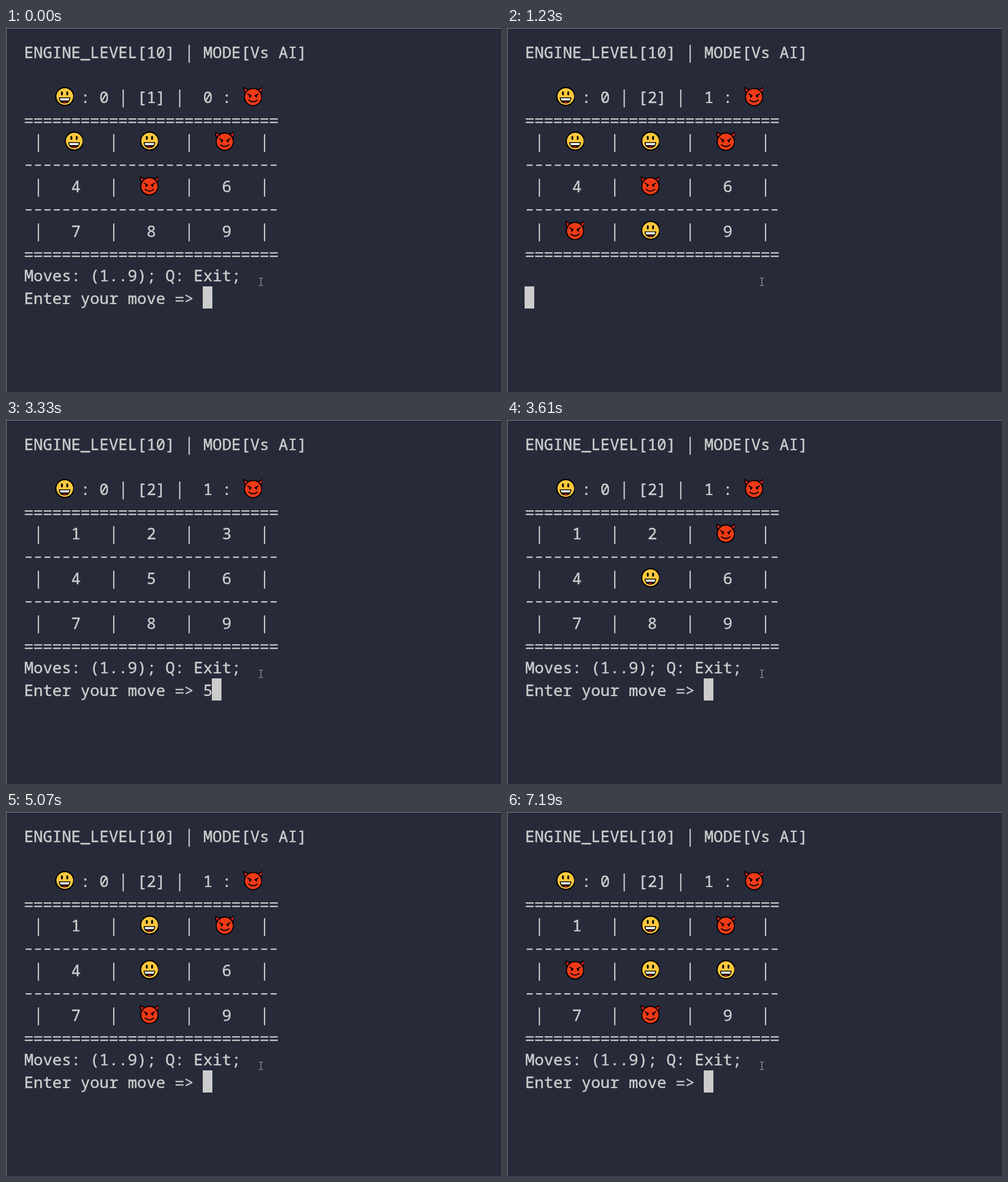
These frames come from a looping animation (873 by 641 pixels, 8000 ms). An HTML page with a canvas:

```html
<!DOCTYPE html>
<html lang="en">
<head>
<meta charset="utf-8">
<title>Terminal tic-tac-toe</title>
<style>
html, body { margin: 0; width: 100%; height: 100%; overflow: hidden; background: #272a39; }
canvas { display: block; }
</style>
</head>
<body>
<canvas id="stage" width="873" height="641"></canvas>
<script>
const ctx = document.getElementById('stage').getContext('2d');
const BG = '#272a39', FG = '#cccccc';
const LEFT = 31.5, TOP = 23, CELL = 16.62, LINE = 39.3;
const DURATION = 8000;

// Each state: start time, board (o = player, x = engine), typed text, phase
const states = [
  [0, 'oox.x....', '', 'prompt'],
  [930, 'oox.x....', '8', 'prompt'],
  [1080, '', '', 'clear'],
  [1230, 'oox.x.xo.', '', 'wait'],
  [1940, '.........', '', 'prompt'],
  [3330, '.........', '5', 'prompt'],
  [3480, '....o....', '', 'wait'],
  [3610, '..x.o....', '', 'prompt'],
  [4830, '..x.o....', '2', 'prompt'],
  [4970, '.ox.o....', '', 'wait'],
  [5070, '.ox.o..x.', '', 'prompt'],
  [6920, '.ox.o..x.', '6', 'prompt'],
  [7070, '.ox.oo.x.', '', 'home'],
  [7190, '.oxxoo.x.', '', 'prompt']
];

const colX = col => LEFT + col * CELL;
const rowY = row => TOP + row * LINE;

// Line-like characters as boxes: x, y from the baseline, width, height
const bars = {
  '|': [[7.9, -23.5, 2.2, 31.5]],
  '-': [[3.2, -9.2, 10.4, 2.3]],
  '=': [[1.6, -12, 14, 2.3], [1.6, -6, 14, 2.3]]
};

function text(str, row, col = 0, color = FG) {
  ctx.fillStyle = ctx.strokeStyle = color;
  ctx.lineWidth = 0.45;
  [...str].forEach((ch, i) => {
    const x = colX(col + i), base = rowY(row) + 30.2;
    if (bars[ch]) {
      for (const [dx, dy, w, h] of bars[ch]) ctx.fillRect(x + dx, base + dy, w, h);
    } else {
      ctx.fillText(ch, x + 0.4, base);
      ctx.strokeText(ch, x + 0.4, base);
    }
  });
}

function cursor(row, col) {
  ctx.fillStyle = FG;
  ctx.fillRect(Math.round(colX(col) - 0.5), Math.round(rowY(row)), 17, 39);
}

function shape(path, fill, width) {
  const p = new Path2D(path);
  if (fill) { ctx.fillStyle = fill; ctx.fill(p); }
  if (width) { ctx.lineWidth = width; ctx.stroke(p); }
}

function disc(x, y, rx, ry, fill, width) {
  ctx.beginPath();
  ctx.ellipse(x, y, rx, ry, 0, 0, 7);
  ctx.fillStyle = fill;
  ctx.fill();
  if (width) { ctx.lineWidth = width; ctx.stroke(); }
}

function smiley() {
  disc(0.8, 0, 15.8, 15.8, '#ffc83d', 2.2);
  disc(-4.2, -5.5, 1.7, 3.6, '#000');
  disc(5.2, -5.5, 1.7, 3.6, '#000');
  shape('M-9 2.5H10C9.5 8.5 6 11.5 .5 11.5S-8.5 8.5-9 2.5Z', '#000', 1.5);
  shape('M-8 3.2H9L8 7H-7Z', '#fff');
  shape('M-3 10.5Q.5 7.5 4 10.5Q.5 12-3 10.5Z', '#e81224');
}

function devil() {
  shape('M-13-5Q-17-11-15.3-16.2Q-12-12.5-6-12.5Z', '#d01c1c', 1.8);
  shape('M14-5Q18-11 16.3-16.2Q13-12.5 7-12.5Z', '#d01c1c', 1.8);
  disc(0.5, 1, 15.2, 15.2, '#f03a17', 2);
  shape('M-9-4.5L-3-1.5M10-4.5L4-1.5', null, 1.8);
  disc(-5, 0, 1.7, 2.1, '#000');
  disc(6, 0, 1.7, 2.1, '#000');
  shape('M-7 6.5Q.5 12.5 8 6.5', null, 1.9);
}

// Emoji are cut off at the right edge of their cells
function emoji(draw, row, col) {
  ctx.save();
  ctx.translate(colX(col) + 21.5, rowY(row) + 19);
  ctx.beginPath();
  ctx.rect(-18, -20, 34.3, 40);
  ctx.clip();
  ctx.strokeStyle = '#000';
  ctx.lineCap = ctx.lineJoin = 'round';
  draw();
  ctx.restore();
}

function drawBoard(board, round) {
  text('ENGINE_LEVEL[10] | MODE[Vs AI]', 0);
  text(`: 0 | [${round}] |  ${round - 1} :`, 2, 6);
  emoji(smiley, 2, 3);
  emoji(devil, 2, 23);
  for (const row of [3, 9]) text('='.repeat(27), row);
  for (const row of [5, 7]) text('-'.repeat(27), row);
  for (const row of [4, 6, 8]) text(' |       |       |       |', row);
  [...board].forEach((mark, i) => {
    const row = 4 + 2 * Math.floor(i / 3), col = 5 + 8 * (i % 3);
    if (mark === '.') text(String(i + 1), row, col);
    else emoji(mark === 'o' ? smiley : devil, row, col - 1);
  });
}

function drawPointer() {
  ctx.fillStyle = '#b4b5ba';
  ctx.fillRect(449, 441, 1, 12);
  for (const y of [440, 453]) {
    ctx.fillRect(446, y, 3, 1);
    ctx.fillRect(450, y, 3, 1);
  }
}

function render(now) {
  const t = now % DURATION;
  const [start, board, typed, phase] = states.findLast(s => s[0] <= t);
  ctx.fillStyle = BG;
  ctx.fillRect(0, 0, 873, 641);
  ctx.fillStyle = '#85878c';
  ctx.fillRect(0, 0, 873, 1);
  ctx.fillRect(0, 0, 1, 641);
  ctx.font = '27.7px "Noto Sans Mono", monospace';

  if (phase !== 'clear') drawBoard(board, start < 1230 ? 1 : 2);
  if (phase === 'prompt') {
    text('Moves: (1..9); Q: Exit;', 10);
    text('Enter your move => ' + typed, 11);
    cursor(11, 19 + typed.length);
  } else {
    cursor(phase === 'wait' ? 11 : 0, 0);
    if (phase === 'home') text('E', 0, 0, BG);
  }
  drawPointer();
}

function loop() {
  render(performance.now());
  requestAnimationFrame(loop);
}
loop();
</script>
</body>
</html>
```
